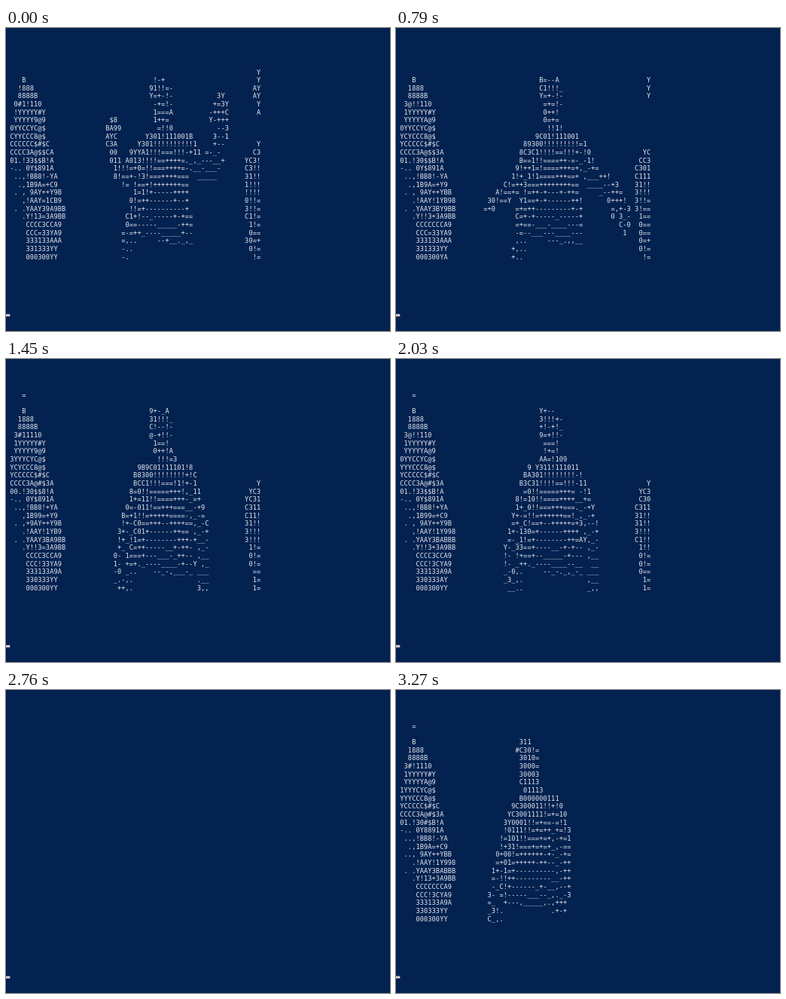
Animation of 510x402 px, one loop 3.3 s. Source, as an HTML page with a canvas:

```html
<!DOCTYPE html>
<html lang="en">
<head>
<meta charset="utf-8">
<title>ASCII scene in a terminal</title>
<style>
html, body { margin: 0; width: 100%; height: 100%; overflow: hidden; background: #032250; }
canvas { display: block; }
</style>
</head>
<body>
<canvas id="stage" width="510" height="402"></canvas>
<script>
const LOOP = 3300, STEP = 30, CELL_W = 5.285, CELL_H = 10.66;
const TOP_ROW = 4, FIGURE_COL = 22, COLS = 64, PROMPT_ROW = 35;
const RAMP = '.,_-+=!103CYAB98$#@';

// Each line: left shape | middle figure | right edge
const pose = (time, hold, head, art) => ({
  time, hold, head,
  lines: art.slice(1).split('\n').map(line => line.split('|'))
});

const poses = [
pose(0, 30, 15, `
||
||Y
    B|               !-+|Y
   !888|              91!!=-|AY
   8888B|              Y=+-!-           3Y|AY
  0#1!110|               -+=!-          +=3Y|Y
  !YYYYY#Y|               1===A         -+++C|A
  YYYYY9@9|    $8         1++=          Y-+++|
 0YYCCYC@$|   BA99         =!!0           --3|
 CYYCCC8@$|   AYC       Y301!111001B     3--1|
 CCCCCC$#$C|   C3A     Y301!!!!!!!!!!1    +--|Y
 CCCC3A@$$CA|    00   9YYA1!!!===!!!-+11 =-_-|C3
 01.!33$$B!A|    011 A013!!!!==++++=._,_---__+|YC3!
 -.. 0Y$891A|     1!!!=+0=!!===++++=-.__-___-|C3!!
  ..,!BB8!-YA|     8!==+-!3!===++++===  _____|31!!
   .,1B9A=+C9|       != !==+!+++++++==|1!!!
  . , 9AY++Y9B|          1=1!+-----++++|!!!!
    ,!AAY=1CB9|         0!=++------+--+|0!!=
  . .YAAY39A9BB|         !!=+----------+|3!!=
    .Y!13=3A9BB|        C1+!--_-----+-+==|C1!=
     CCCC3CCA9|        0==-----_____-++=|1!=
     CCC=33YA9|       =-=++_----_____+--|0==
     333133AAA|       =,..     --+__._,_|30=+
     331333YY|       -..|0!=
     000300YY|       -.|!=`),
pose(790, 60, 14, `
||
||
    B|              B=--A|Y
   1888|              C1!!!_|Y
   8888B|              Y=+-!-|Y
  3@!!110|               =+=!-|
  1YYYYY#Y|               0++!|
  YYYYYA@9|               0=+=|
 0YYCCYC@$|                !!1!|
 YCYCCC8@$|             9C01!111001|
 YCCCCC$#$C|          89300!!!!!!!!!=1|
 CCCC3A@$$3A|         8C3C1!!!!==!!!+-!0|YC
 01.!30$$B!A|         B==1!!====++-=-_-1!|CC3
 -.. 0Y$891A|        9!++1=!====+++=+,_-+=|C301
  ..,!BB8!-YA|       1!+_1!1====+++==+ ,___++!|C111
   .,1B9A=+Y9|     C!=++3===++++++++==  ____--+3|31!!
  . , 9AY++YBB|   A!==+= !=++-+---+-++=     _--++=|3!!!
    .!AAY!1YB98| 30!==Y  Y1==+-+------++!      0+++!|3!!=
  . .YAAY3BY9BB|=+0     =+=++---------+-+       =,+-3|3!==
    .Y!!3+3A9BB|        C=+-+-----_-----+       0 3_-|1==
     CCCCCCCA9|        =+==-___-____---=         C-0|0==
     CCC=33YA9|        -=--___---____---          1|0==
     333133AAA|        ,..     ---_.,,__|0=+
     331333YY|       +,..|0!=
     000300YA|       +..|!=`),
pose(1450, 70, 14, `
    =||
||
    B|              9+-_A|
   1888|              31!!!_|
   8888B|              C!--!-|
  3#11110|              @-+!!-|
  1YYYYY#Y|               1==!|
  YYYYY9@9|               0++!A|
 3YYYCYC@$|                !!!=3|
 YCYCCC8@$|           9B9C01!11101!8|
 YCCCCC$#$C|          B8300!!!!!!!!+!C|
 CCCC3A@#$3A|          BCC1!!!===!1!+-1|Y
 00.!30$$8!A|         8=0!!=====+++!,_11|YC3
 -.. 0Y$891A|         1+=11!!====+++-_=+|YC31
  ..,!BB8!+YA|        0=-011!==+++===__-+9|C311
    ,1B99=+Y9|       B=+1!!=+++++====-,_-=|C11!
  . ,+9AY++Y9B|       !+-C0==+++--++++==,_-C|31!!
    .!AAY!1YB9|      3+-_C01+------++== ,_-+|3!!!
  . .YAAY3BA9BB|      !+_!1=+--------+++-+__-|3!!!
    .Y!!3=3A9BB|      +_ C=++-----__+-++- ,_-|1!=
     CCCC3CCA9|     0- 1===+---___-_++-- ,__|0!=
     CCC!33YA9|     1- +=+._----____-+--Y ,_|0!=
     333133A9A|     -0 _..    --_-,___-_ ___|==
     330333YY|     _.-,.                .__|1=
     000300YY|      ++,.                3,,|1=`),
pose(2030, 30, 14, `
    =||
||
    B|              Y+--|
   1888|              3!!!+-|
   8888B|              +!-+!_|
  3@!!110|              9=+!!-|
  1YYYYY#Y|               ===!|
  YYYYYA@9|               !+=!|
 0YYCCYC@$|              AA=!109|
 YYYCCC8@$|           9 Y311!111011|
 YCCCCC$#$C|          BA301!!!!!!!!-!|
 CCCC3A@#$3A|         B3C31!!!!==!!!-11|Y
 01.!33$$B!A|          =0!!=====+++= -!1|YC3
 -.. 0Y$891A|        8!=10!!====++++__+=|C30
  ..,!BB8!+YA|        1+_0!!===+++===._-+Y|C311
   .,1B99=+C9|       Y+-=!!=++++++==!_,_-+|31!!
  . , 9AY++Y9B|       =+_C!==+--+++++=+3,--!|31!!
    ,!AAY!1Y998|      1+-130=+------++++ ,_-+|3!!!
  . .YAAY3BABBB|      =-_1!=+--------++=AY,_-|C1!!
    .Y!!3+3A9BB|     Y-_33==+----__-+-+-- ,_-|1!!
     CCCC3CCA9|     !- !+==+--_____-+--- ,__|0!=
     CCC!3CYA9|     !- _++._----____--__  __|0!=
     333133A9A|     _-0,.     --_-._,_-_ ___|0==
     330333AY|     _3_,.                ,__|1=
     000300YY|      __..                _,,|1=`),
pose(2420, 100, 14, `
    =||
||
    B|              !+-=|
   1888|             90!!!_|
   8888B|              ==-=-Y|
  3@!!110|              Y+!!1A|
  1YYYYY#Y|              ====0|
  YYYYY9@0|               =+=1|
 0YYYCYC@$|              @1=!!0|
 YCYCCC8@$|           B Y011!110311|
 YCCCCC$#$C|          BC001!!!!!!!!11|
 CCCC3A@#$CA|         BCC311!!==!!!=_=0|
 00.!30$$B!A|         111!!=====+-==_!!|CC
 -.. 0Y8891A|         =!=11!====++++,-=!|CC3
  ..,!BB8!-YA|        !+=3!!==+++===+,_-=|C31
   .,1B9A=+C9|       1+-10!==++++++==_,_-=|C31!
  .., 9AY++YBB|      C=+-0!!++--++-++=Y,_--|C0!!
    .!9AY!1YB98|      !+-Y03++------++++ __-1|1!!
  . .YAAY3BYBBB|     A+-C1=+---------+-+ ,_-+|1!!
    .Y!!3=CA9BB|     !--031+-------+-+++ A__-|3!!
     CCCCCCCA9|     =_ 01==----_-__+---_ ,_-|3!=
     CCC!3CYA9|     +-,3+_-++---____--__ ,__|3!=
     333133AAA|    +-__..    ,--_,,____, _--|!=
     330333YY|     _ _..                ,_-|0!
     000300YY|       _.                  ,_|0=`),
pose(3270, 30, 9, `
    =||
||
    B|         311|
   1888|        #C30!=|
   8888B|         3010=|
  3#!1110|         3000=|
  1YYYYY#Y|         30003|
  YYYYYA@9|         C1113|
 1YYYCYC@$|          01113|
 YYYCCC8@$|         B000000111|
 YCCCCC$#$C|       9C300011!!+!0|
 CCCC3A@#$3A|      YC3001111!=+=10|
 01.!30#$B!A|     3Y0001!!=+==-=!1|
 -.. 0Y8891A|     !0111!!=+=++_+=!3|
  ..,!BB8!-YA|    !=101!!===+=+,-+=1|
   .,1B9A=+C9|    !+31!===+=+=+_,-==|
  .., 9AY++YBB|   0+00!=++++++-+-_-+=|
    .!AAY!1Y998|   =+01=+++++-++--_-++|
  . .YAAY3BABBB|  1+-1=+----------,-++|
    .Y!13+3A9BB|  =-!!++---------__-++|
     CCCCCCCA9|  -_C!+------_+-__,--+|
     CCC!3CYA9| 3- =!-----___--_,._-3|
     333133A9A| =_  +---,_____,.,+++|
     330333YY| _3!.            .+-+|
     000300YY| C_,.|`)
];

// Moments when the screen is cleared: [time, rows drawn so far, cursor row]
const redraws = [[300, 3, 3], [960, 0, 0], [1260, 20, 20],
  [1800, 14, 14], [2580, 24, 24], [2760, 0, PROMPT_ROW]];

const ctx = document.getElementById('stage').getContext('2d');

const noise = (a, b, c) => {
  const s = Math.sin(a * 12.9898 + b * 78.233 + c * 37.719) * 43758.5453;
  return s - Math.floor(s);
};

// Now and then a glyph slips one place along the brightness ramp
function flicker(ch, col, row, step) {
  const n = noise(col, row, step), i = RAMP.indexOf(ch);
  return n < .12 && i >= 0 ? RAMP[i + (n < .06 ? -1 : 1)] || ch : ch;
}

function drawText(text, col, row, step) {
  [...text].forEach((ch, i) => {
    if (ch === ' ') return;
    const x = col + i;
    ctx.fillText(step < 0 ? ch : flicker(ch, x, row, step), x * CELL_W, row * CELL_H + 8.2);
  });
}

function draw(t) {
  const a = poses.findLastIndex(p => p.time <= t), from = poses[a];
  const to = poses[a + 1] || from, start = from.time + from.hold;
  const still = t < start;
  const u = still ? 0 : (t - start) / (to.time - start);
  const near = u < .5 ? from : to;
  const shift = Math.round(from.head + (to.head - from.head) * u - near.head);
  const step = still ? -1 : Math.floor(t / STEP);
  const [, rows, cursor] = redraws.find(r => t >= r[0] && t < r[0] + STEP) || [0, PROMPT_ROW, PROMPT_ROW];

  ctx.fillStyle = '#032250';
  ctx.fillRect(0, 0, 510, 402);
  ctx.fillStyle = '#e6e8ee';
  ctx.font = '8.6px "DejaVu Sans Mono", "Noto Sans Mono", monospace';
  near.lines.forEach(([left, figure, right], i) => {
    const row = TOP_ROW + i;
    if (row >= rows) return;
    drawText(left, 0, row, step);
    drawText(figure, FIGURE_COL + shift, row, step);
    drawText(right, COLS - right.length, row, step);
  });
  ctx.fillStyle = '#ddd6cc';
  ctx.fillRect(0, cursor * CELL_H + 6.5, CELL_W, 3);
}

function tick(now) {
  draw(now % LOOP);
  requestAnimationFrame(tick);
}
requestAnimationFrame(tick);
</script>
</body>
</html>
```
